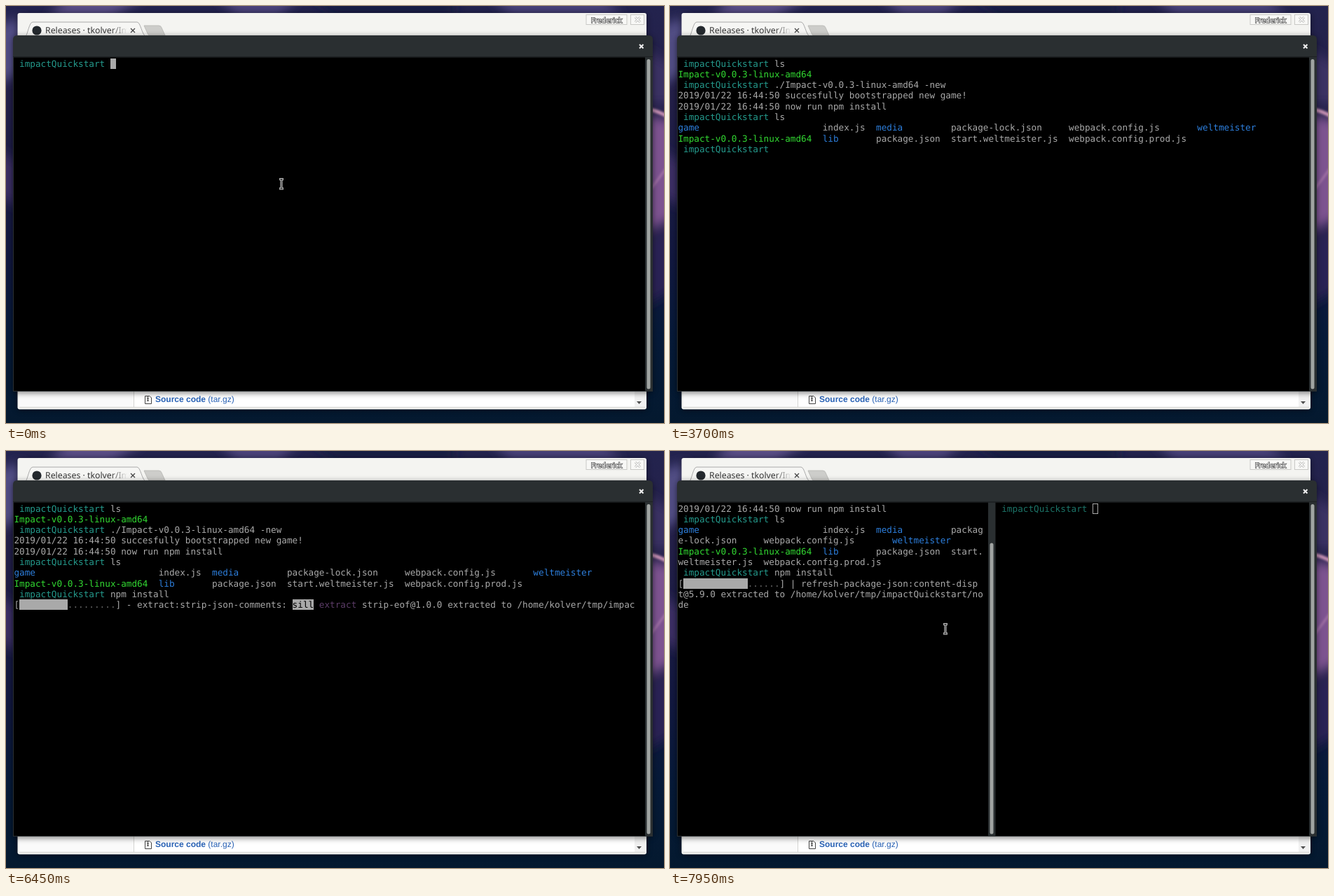
Write an HTML page that moves like this. It is 939 by 596 pixels and loops after 8000 ms.

```html
<!DOCTYPE html>
<html lang="en">
<head>
<meta charset="utf-8">
<title>Terminal quickstart</title>
<style>
html, body { margin: 0; width: 939px; height: 596px; overflow: hidden; }
body { position: relative; background: #061a36; }
svg, pre { position: absolute; left: 0; top: 0; }
svg text { text-rendering: geometricPrecision; }
pre {
  margin: 0; left: 11.4px; top: 74.6px; width: 890px;
  font: 12.69px/15.3px "DejaVu Sans Mono", monospace;
  text-rendering: geometricPrecision;
  white-space: break-spaces; line-break: anywhere;
  color: #a9a9a9;
}
#view { position: absolute; left: 0; top: 74px; width: 939px; height: 476px; overflow: hidden; }
#view pre { top: .6px; }
#view .split { width: 439px; top: -60.6px; }
#right { left: 465.6px; width: 440px; }
.teal { color: #249a8c; }
.dim { color: #1c7468; }
.green { color: #32d932; }
.blue { color: #2d7fdd; }
.plum { color: #5d3d69; }
.dots { color: #666; }
.inv { background: #a9a9a9; color: #000; }
.hollow { outline: 1px solid #aaa; outline-offset: -1px; }
</style>
</head>
<body>
<svg width="939" height="596">
  <defs>
    <linearGradient id="fade" gradientUnits="userSpaceOnUse" x1="150" x2="173">
      <stop stop-color="#333"/><stop offset="1" stop-color="#333" stop-opacity="0"/>
    </linearGradient>
    <linearGradient id="sky" x2="0" y2="1">
      <stop stop-color="#23234e"/><stop offset=".2" stop-color="#242049"/>
      <stop offset=".6" stop-color="#12183f"/><stop offset=".8" stop-color="#061a38"/>
      <stop offset="1" stop-color="#04192f"/>
    </linearGradient>
    <filter id="haze" x="-50%" y="-50%" width="200%" height="200%"><feGaussianBlur stdDeviation="8"/></filter>
    <filter id="soft" x="-50%" y="-50%" width="200%" height="200%"><feGaussianBlur stdDeviation="1.5"/></filter>
    <filter id="blur" x="-5%" y="-5%" width="110%" height="110%"><feGaussianBlur stdDeviation="4"/></filter>
  </defs>

  <!-- blurred wallpaper -->
  <rect width="939" height="596" fill="url(#sky)"/>
  <g filter="url(#haze)">
    <path d="M-20 30L25 15V95L-20 115Z" fill="#514e84"/>
    <path d="M-20 200L20 225V290L-20 265Z" fill="#3b2f63"/>
    <path d="M90 -15H200L150 16H60Z" fill="#5b5087"/>
    <path d="M300 -15H420L390 15H330Z" fill="#4d457c"/>
    <path d="M430 -15H640V14H470Z" fill="#171d42"/>
    <path d="M690 -15H850L880 14H720Z" fill="#4a4379"/>
    <path d="M910 60L960 90V140H910Z" fill="#3a3263"/>
    <path d="M910 155L960 165V300L910 325Z" fill="#7d5390"/>
    <path d="M910 335L960 310V400L910 430Z" fill="#2b2454"/>
  </g>
  <g filter="url(#soft)" fill="none" stroke="#c58fb2">
    <path d="M918 148Q930 150 942 157" stroke-width="5"/>
    <path d="M920 262L942 232" stroke="#a070a4" stroke-width="3"/>
  </g>

  <!-- browser window behind -->
  <rect x="16" y="11" width="898.5" height="567" rx="4" opacity=".45" filter="url(#blur)"/>
  <rect x="16.500" y="10" width="897.500" height="566.500" rx="3" fill="#f4f4f1"/>
  <path d="M19 500H897V573H19Z" fill="#fff"/>
  <path d="M19 500H182V573H19Z" fill="#fafafa"/>
  <path d="M182.500 545V573M19 573.500H912" stroke="#d5d5d2"/>
  <path d="M897 500H911V573H897Z" fill="#f1f1f1"/>
  <path d="M900 565H907L903.500 569Z" fill="#505050"/>
  <path d="M17 43H28C31 41 33 23 38 23H187C192 23 194 41 199 43" fill="#f6f6f4" stroke="#aaa"/>
  <path d="M197 28H218Q221 28 222 31L227 42H205Q203 42 202 39Z" fill="#cdcdca" stroke="#bdbdba"/>
  <circle cx="44" cy="35" r="6.600" fill="#24292e"/>
  <text x="56" y="39" font-family="Noto Sans, Open Sans, sans-serif" font-size="12.3" fill="url(#fade)">Releases · tkolver/Im</text>
  <path d="M178 32L184 38M184 32L178 38" stroke="#444" stroke-width="1.300"/>
  <g fill="#f8f8f6" stroke="#c8c8c5">
    <rect x="828" y="12.500" width="58" height="14"/>
    <rect x="891.500" y="12.500" width="19" height="14"/>
  </g>
  <path d="M898 16L905 23M905 16L898 23" stroke="#b5b5b2" stroke-width="3"/>
  <path d="M898 16L905 23M905 16L898 23" stroke="#fff" stroke-width="1.300"/>
  <text x="857" y="23.500" text-anchor="middle" font-family="Noto Sans, sans-serif" font-size="10.3" fill="#fff" stroke="#555" stroke-width="1.500" paint-order="stroke">Frederick</text>
  <path d="M198.500 557.500H205L207.500 560V568.500H198.500ZM202.500 558V565M201 561H204M201 564H204" fill="none" stroke="#444"/>
  <text x="213" y="566" font-family="Liberation Sans, Arial, sans-serif" font-size="12" fill="#2962b5"><tspan font-weight="bold">Source code</tspan> (tar.gz)</text>

  <!-- terminal window -->
  <rect x="10" y="44" width="913" height="509" rx="6" opacity=".5" filter="url(#blur)"/>
  <path d="M10 551V48Q10 42 16 42H917Q923 42 923 48V551Z" fill="#2a2f31"/>
  <path d="M10 72.500H923" stroke="#1d2123"/>
  <path d="M11 73.500H912V550H11Z"/>
  <path d="M904 55L909.500 60.500M909.500 55L904 60.500" stroke="#f2f2f2" stroke-width="2"/>
  <rect x="914.500" y="76" width="5" height="471.500" rx="2.500" fill="#a0a4a2"/>
  <g id="divider">
    <path d="M454 73.500H464.500V550H454Z" fill="#2a2f31"/>
    <rect x="456.500" y="131.500" width="5" height="416" rx="2.500" fill="#a0a4a2"/>
  </g>
</svg>
<div id="view"><pre id="left"></pre><pre id="right"></pre></div>
<svg id="mouse" width="939" height="596" fill="none">
  <path d="M390 247.500H396M390 261H396M393 247.500V261" stroke="#ddd" stroke-width="3"/>
  <path d="M390.500 247.500H395.500M390.500 261H395.500M393 247.500V261" stroke="#111"/>
</svg>
<script>
const LOOP = 8000, STEP = 50, SPLIT = 6850;
const COLS = 116, HALF = 56;
const $ = id => document.getElementById(id);
const span = (cls, text) => `<span class="${cls}">${text}</span>`;
const prompt = ' ' + span('teal', 'impactQuickstart') + ' ';
const binary = span('green', 'Impact-v0.0.3-linux-amd64');
const gap = n => ' '.repeat(n);
const listing = [
  span('blue', 'game') + gap(23) + 'index.js  ' + span('blue', 'media') + gap(9) +
    'package-lock.json' + gap(5) + 'webpack.config.js' + gap(7) + span('blue', 'weltmeister'),
  binary + gap(2) + span('blue', 'lib') + gap(7) +
    'package.json  start.weltmeister.js  webpack.config.prod.js'
].join('\n');

// [time, text added to the terminal]
const session = [
  [0, prompt], [350, 'l'], [450, 's'], [600, '\n'], [650, binary + '\n'], [750, prompt],
  [1450, './'], [1600, 'I'], [1850, 'mpact-v0.0.3-linux-amd64 '],
  [2500, '-n'], [2600, 'e'], [2650, 'w'],
  [2800, '\n2019/01/22 16:44:50 succesfully bootstrapped new game!' +
    '\n2019/01/22 16:44:50 now run npm install\n' + prompt],
  [3250, 'l'], [3400, 's'], [3500, '\n' + listing + '\n' + prompt],
  [4250, 'n'], [4300, 'p'], [4400, 'm'], [4500, ' '], [4550, 'i'], [4600, 'ns'], [4700, 'ta'],
  [4850, 'll'], [4900, '\n']
];
const cursorOff = [[50, 350], [950, 1250], [2150, 2300], [3050, 3200], [3700, 4250], [5050, LOOP]];

const loading = ['eslint@5.9.0', 'babel-loader@8.0.4', 'webpack@4.26.0', 'webpack-cli@3.1.2',
  'ajv-keywords@3.2.0', 'schema-utils@1.0.0', 'webpack-log@2.0.0'];
const packages = ['ms@2.0.0', 'isarray@1.0.0', 'inherits@2.0.3', 'path-key@2.0.1', 'semver@5.6.0',
  'shebang-regex@1.0.0', 'which@1.3.1', 'pump@3.0.0', 'signal-exit@3.0.2', 'strip-eof@1.0.0',
  'strip-json-comments@2.0.1', 'text-table@0.2.0', 'through@2.3.8', 'tslib@1.9.3',
  'table@5.1.0', 'rxjs@6.3.3', 'lodash@4.17.11', 'eslint@5.9.0'];
const refreshed = ['serialize-javascript', 'spdx-license-ids', 'end-of-stream', 'array-includes',
  'string-decoder', 'content-disposition'];
const home = '/home/kolver/tmp/impactQuickstart/node_modules/.staging';
const nameOf = p => p.split('@')[0];

// npm's status line, cut to the given width
function progress(fill, spin, task, level, prefix, message, width = COLS) {
  const parts = [['', '['], ['inv', gap(fill)], ['dots', '.'.repeat(18 - fill)],
    ['', `] ${'|/-\\'[spin % 4]} ${task}: `], [level === 'sill' ? 'inv' : 'blue', level],
    ['', ' '], ['plum', prefix], ['', ' ' + message]];
  return parts.map(([cls, text]) => {
    const shown = text.slice(0, width);
    width -= shown.length;
    return shown && span(cls, shown);
  }).join('');
}
const extract = (fill, spin, task, pkg, width) =>
  progress(fill, spin, 'extract:' + task, 'sill', 'extract', `${pkg} extracted to ${home}`, width);

function install(t) {
  const since = start => Math.floor((t - start) / STEP);
  if (t < 5050) return '';
  if (t < 5300) return progress(0, 1, 'rollbackFailedOptional', 'verb', 'npm-session', '1cd03fbd66a73b0b');
  if (t < 6000) {
    const i = Math.min(since(5300), 7), pkg = loading[Math.min(i, 6)];
    const [prefix, message] = i < 7
      ? ['resolveWithNewModule', pkg + ' checking installable status']
      : ['removeObsoleteDep', 'removing weltmeister@file:dist/weltmeister from the tree'];
    return progress(1 + Math.floor(i * .6), i + 2, 'loadDep:' + nameOf(pkg), 'sill', prefix, message);
  }
  if (t < SPLIT) {
    const i = since(6000);
    return extract(5 + Math.floor(i * .45), i + 1, nameOf(packages[i + 1]), packages[i]);
  }
  if (t < 7200) return extract(12, since(SPLIT) + 1, 'eslint', 'eslint@5.9.0');
  const i = since(7200), pkg = packages[(i + 11) % 17];
  const line = t < 7700
    ? extract(12, i, nameOf(pkg), pkg, HALF)
    : progress(12, i + 1, 'refresh-package-json:' + refreshed[i - 10], 'sill', '', '', HALF);
  return line + `\nt@5.9.0 extracted to ${home}`.slice(0, 58) + '\nde';
}

function draw(t) {
  const split = t >= SPLIT;
  const typed = session.filter(([time]) => time <= t).map(([, text]) => text).join('');
  const blank = cursorOff.some(([from, to]) => t >= from && t < to);
  $('left').innerHTML = typed + (blank ? '' : span('inv', ' ')) + install(t);
  $('left').className = split ? 'split' : '';
  $('right').innerHTML = split
    ? (t < 7500 ? '' : ' ' + span('dim', 'impactQuickstart') + ' ') + span('hollow', ' ') : '';
  $('divider').style.display = split ? '' : 'none';
  $('mouse').style.display = t < 350 || split ? '' : 'none';
}

const start = performance.now();
let last = -1;
function tick() {
  const t = Math.floor((performance.now() - start) % LOOP / STEP) * STEP;
  if (t !== last) draw(last = t);
  requestAnimationFrame(tick);
}
tick();
</script>
</body>
</html>
```
